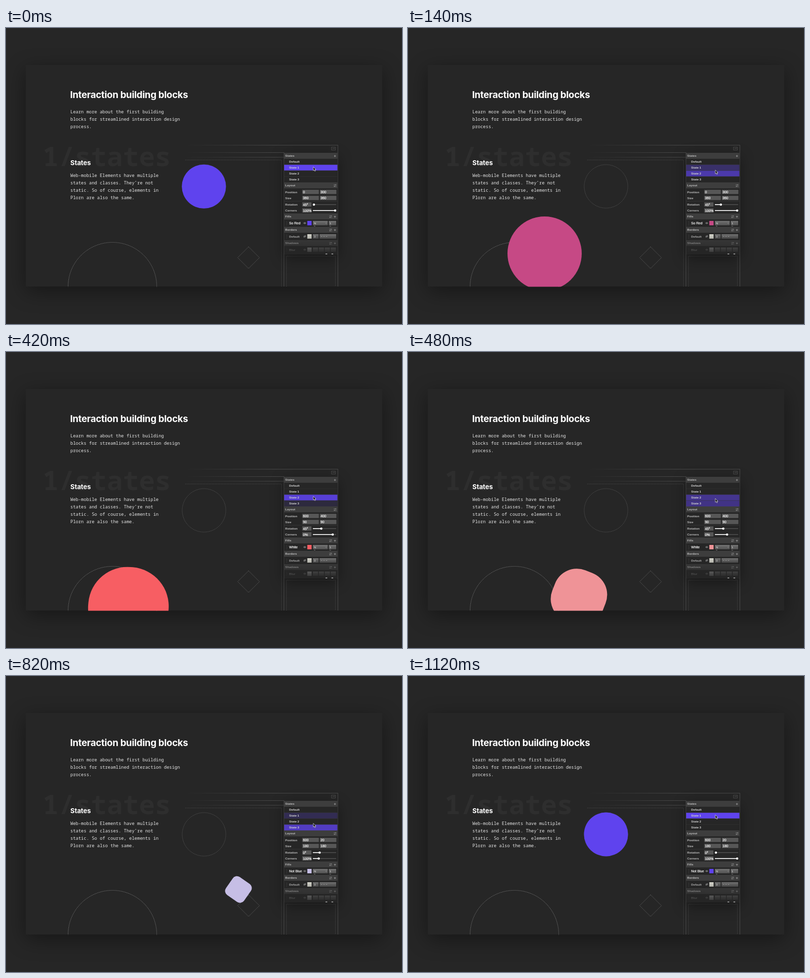
Write an HTML page that moves like this. It is 800 by 600 pixels and loops after 1140 ms.

```html
<!DOCTYPE html>
<html lang="en">
<head>
<meta charset="utf-8">
<title>Interaction building blocks</title>
<style>
  html, body { margin: 0; height: 100%; overflow: hidden; background: #262626; }
  svg { display: block; width: 800px; height: 600px; }
  text { white-space: pre; }
  .title { font: 700 19px Inter, sans-serif; letter-spacing: -.3px; fill: #fff; }
  .subtitle { font: 700 13.3px Inter, sans-serif; fill: #fff; }
  .body { font: 9px "Noto Sans Mono", monospace; fill: #e6e6e6; }
  .ghost { font: 700 54px "Noto Sans Mono", monospace; fill: #2e2e2e; }
  .label { font: 700 6.2px "Liberation Sans", Arial, sans-serif; fill: #bdbdbd; }
  .value { font: 6.8px "Liberation Sans", Arial, sans-serif; fill: #fff; stroke: #fff; stroke-width: .2; }
  .line { fill: none; stroke: #484848; }
  .dash { fill: none; stroke: #505050; stroke-dasharray: 1.5 1.5; }
  .icon { fill: none; stroke: #aaa; stroke-width: .8; }
  .card { filter: drop-shadow(0 10px 20px rgba(0, 0, 0, .4)); }
  .panel { filter: drop-shadow(0 8px 14px rgba(0, 0, 0, .4)); }
</style>
</head>
<body>
<svg viewBox="0 0 800 600">
  <defs>
    <linearGradient id="fadeIn" gradientUnits="userSpaceOnUse" x1="360" x2="540" y1="0" y2="0">
      <stop stop-color="#484848" stop-opacity="0"/><stop offset="1" stop-color="#484848"/>
    </linearGradient>
    <linearGradient id="fadeOut" x2="0" y2="1">
      <stop stop-color="#252525" stop-opacity="0"/><stop offset="1" stop-color="#252525" stop-opacity=".95"/>
    </linearGradient>
    <linearGradient id="button" x2="0" y2="1">
      <stop stop-color="#727272"/><stop offset="1" stop-color="#515151"/>
    </linearGradient>
    <clipPath id="cardClip"><path d="M40 75H760V524.5H40Z"/></clipPath>
  </defs>

  <rect width="800" height="600" fill="#262626"/>
  <rect class="card" x="40" y="75" width="720" height="449" fill="#262626"/>

  <text class="ghost" x="74" y="280">1/states</text>
  <text class="title" x="129.5" y="142">Interaction building blocks</text>
  <g id="copy"></g>
  <text class="subtitle" x="130" y="277.5">States</text>

  <g clip-path="url(#cardClip)">
    <path d="M360 237H670V238H360ZM362 252H561V253H362ZM362 261.5H561V262.5H362Z" fill="url(#fadeIn)"/>
    <path class="line" d="M670.5 237V524M561.5 252V524M561 458.5H670M657.5 241.5h8v6h-8zM659 244.5h5l-1.5-1.5"/>
    <path class="dash" d="M362 267.5H556.5V524M566.5 524V462.5H665.5V524" stroke-opacity=".8"/>
    <circle class="dash" cx="400" cy="321" r="44" style="stroke:#5c5c5c"/>
    <circle class="dash" cx="215" cy="524" r="89.5" style="stroke:#808080"/>
    <path class="dash" d="M490 443.5L512 465.5L490 487.5L468 465.5Z" style="stroke:#6c6c6c"/>
    <rect id="shape"/>
  </g>

  <rect class="panel" x="562" y="253" width="107.5" height="205" fill="#262626"/>
  <g id="rows"></g>
  <g id="controls"></g>
  <rect x="562" y="418" width="107.5" height="41" fill="url(#fadeOut)"/>
  <path d="M645.5 458h3.5M657.5 458h3.5" stroke="#b0b0b0" stroke-width="1.3"/>
  <path id="cursor" d="M0 0V7.6L1.8 6L3 8.8L4.4 8.2L3.2 5.5H5.4Z" fill="#151515" stroke="#eee" stroke-width=".7"/>
</svg>

<script>
const $ = id => document.getElementById(id);

function add(parent, tag, attrs, content = '') {
  const node = document.createElementNS('http://www.w3.org/2000/svg', tag);
  set(node, attrs);
  node.textContent = content;
  return $(parent).appendChild(node);
}
function set(node, attrs) {
  for (const key in attrs) node.setAttribute(key, attrs[key]);
}
const text = (parent, kind, x, y, content, fill) =>
  add(parent, 'text', { class: kind, x, y, ...(fill && { style: `fill:${fill}` }) }, content);
const box = (parent, x, y, width, height, fill) =>
  add(parent, 'rect', { x, y, width, height, fill });
const icon = (d, opacity = 1) => add('controls', 'path', { class: 'icon', d, opacity });

function paragraph(y, lines) {
  lines.forEach((line, i) => text('copy', 'body', 130, y + i * 15, line));
}
paragraph(173, ['Learn more about the first building',
  'blocks for streamlined interaction design', 'process.']);
paragraph(302, ['Web-mobile Elements have multiple', 'states and classes. They’re not',
  'static. So of course, elements in', 'Plorn are also the same.']);

// State list
const highlights = [277, 289, 301].map(y => box('rows', 562, y, 107.5, 12, '#5f43ee'));
['Default', 'State 1', 'State 2', 'State 3'].forEach((name, i) => {
  const y = 265 + i * 12;
  if (i) box('rows', 562, y - .3, 107.5, .6, '#333');
  text('rows', 'label', 572, y + 8.2, name, '#d2d2d2');
});

// Section headers
[['States', 253], ['Layout', 313], ['Fills', 376], ['Borders', 403], ['Shadows', 430]].forEach(([name, y], i) => {
  box('controls', 562, y, 107.5, 12, '#3d3d3d');
  text('controls', 'label', 564, y + 8.2, name);
  if (i != 1) icon(`M662.5 ${y + 6.5}h4M664.5 ${y + 4.5}v4`);
  if (i) {
    const x = i == 1 ? 662 : 653;
    icon(`M${x} ${y + 5}h5.5M${x} ${y + 8}h5.5M${x + 4} ${y + 4}v2M${x + 1.5} ${y + 7}v2`, .8);
  }
});

// Layout fields and sliders
[['Position', 335], ['Size', 347.2], ['Rotation', 360.2], ['Corners', 372.2]].forEach(([name, y], i) => {
  text('controls', 'label', 564, y, name);
  if (i < 2) {
    box('controls', 598.5, y - 7, 33.5, 8.6, '#575757');
    box('controls', 634, y - 7, 33.5, 8.6, '#575757');
  } else {
    box('controls', 598.5, y - 6.8, 18.5, 8.6, '#575757');
    box('controls', 620, y - 2.6, 47, .8, '#777');
  }
});
box('controls', 562, 350.7, 107.5, .7, '#3d3d3d');

const valueAt = (x, y) => text('controls', 'value', x, y, '');
const values = [valueAt(600, 335), valueAt(635.5, 335), valueAt(600, 347.2), valueAt(635.5, 347.2),
  valueAt(600, 360.6), valueAt(600, 372.6), valueAt(572, 398)];

const sliders = [358, 370].map(y => ({
  bar: box('controls', 620, y - .8, 0, 1.6, '#fff'),
  knob: add('controls', 'circle', { cy: y, r: 2.3, fill: '#fff' })
}));

// Fill, border and shadow rows
function styleRow(y, swatch) {
  icon(`M567 ${y - 3}v1m0 2v1m0 2v1`, .5);
  icon(`M601 ${y}q2.5 -3 5 0q-2.5 3 -5 0M603 ${y}h1`);
  return box('controls', 608.7, y - 4.5, 8.7, 9, swatch);
}
const button = (x, y, width) => box('controls', x, y - 4.5, width, 9, 'url(#button)');
const fillSwatch = styleRow(395.5, '#5f43ee');
button(620, 395.5, 30);
button(652, 395.5, 15);
text('controls', 'label', 622, 397.7, 'N');
text('controls', 'label', 653.5, 397.7, '1');
icon('M645.5 395l1.2 1.2l1.2-1.2M622 401.5h3M653.5 401.5h3', .8);

styleRow(422.5, '#d6d6cc');
icon('M601.5 425l4-5');
text('controls', 'label', 572, 424.7, 'Default');
button(620, 422.5, 11.5);
button(633.5, 422.5, 33.5);
text('controls', 'label', 622, 424.7, '3');
icon('M636 422.5h3m2 0h3m2 0h3');

styleRow(449.5, '#b0b0b0');
text('controls', 'label', 572, 451.7, 'Blur');
[620, 632, 644, 656].forEach(x => button(x, 449.5, 10.5));

// x, y, size, radius, angle, red, green, blue, cursor y, rotation knob, corner knob
const poses = [
  [400, 321, 89, 44.5, 0, 95, 67, 238, 281, 622, 665],
  [215, 524, 180, 90, 0, 249, 76, 82, 290.5, 637, 665],
  [490, 465.5, 31.5, 0, 45, 228, 226, 227, 303, 637, 622]
];
// Panel values shown while heading to the next pose
const readouts = [
  ['0', '300', '360', '360', '45°', '100%', 'So Red'],
  ['600', '400', '90', '90', '45°', '0%', 'White'],
  ['600', '20', '180', '180', '0°', '100%', 'Not Blue']
];
const STEP = 380, DURATION = 360;

// cubic-bezier(.25, .1, .25, 1)
function ease(p) {
  if (p >= 1) return 1;
  const bezier = (a, b, u) => 3 * a * u * (1 - u) ** 2 + 3 * b * u * u * (1 - u) + u ** 3;
  let low = 0, high = 1;
  for (let i = 0; i < 24; i++) {
    const mid = (low + high) / 2;
    if (bezier(.25, .25, mid) < p) low = mid; else high = mid;
  }
  return bezier(.1, 1, low);
}

function draw(now) {
  const time = now % (STEP * 3);
  const from = Math.floor(time / STEP), to = (from + 1) % 3;
  const k = ease(time % STEP / DURATION);
  const [x, y, size, rx, angle, r, g, b, cursorY, ...knobs] =
    poses[from].map((v, i) => v + (poses[to][i] - v) * k);
  const fill = `rgb(${r}, ${g}, ${b})`;

  set($('shape'), { x: -size / 2, y: -size / 2, width: size, height: size, rx, fill,
    transform: `translate(${x} ${y}) rotate(${angle})` });
  set(fillSwatch, { fill });
  set($('cursor'), { transform: `translate(620.8 ${cursorY + .5})` });
  highlights.forEach((row, i) => set(row, { opacity: i == from ? 1 - k : i == to ? k : 0 }));
  values.forEach((node, i) => node.textContent = readouts[from][i]);
  sliders.forEach(({ bar, knob }, i) => {
    set(bar, { width: knobs[i] - 620 });
    set(knob, { cx: knobs[i] });
  });
}

const start = performance.now();
function tick() {
  draw(performance.now() - start);
  requestAnimationFrame(tick);
}
tick();
</script>
</body>
</html>
```
